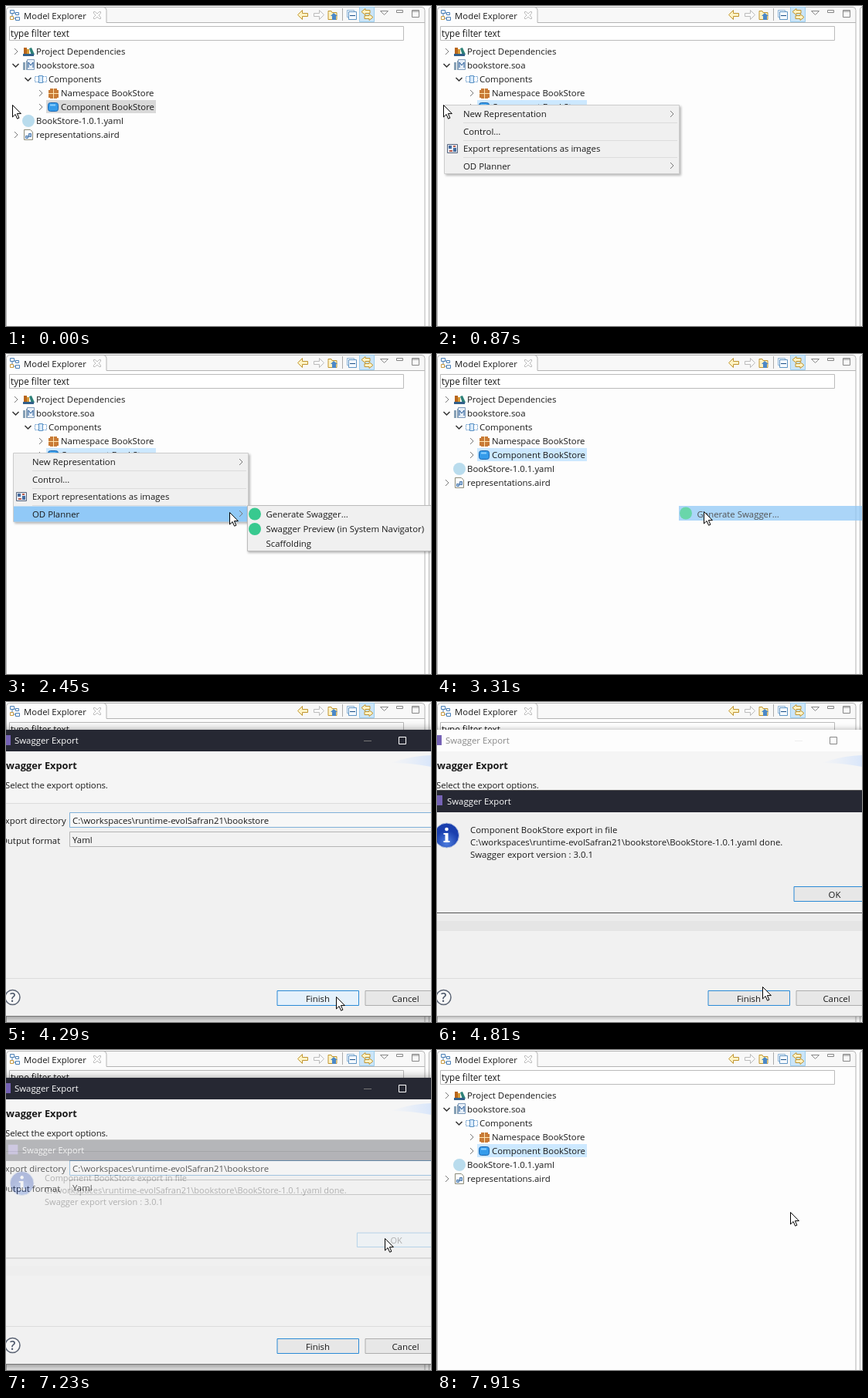
Recreate the animation shown at these times as an HTML page. Size 550x415 px, loop 8000 ms.

```html
<!DOCTYPE html>
<html lang="en">
<head>
<meta charset="utf-8">
<title>Model Explorer</title>
<style>
  html, body { margin: 0; width: 550px; height: 415px; overflow: hidden; background: #fdfdfd; }
  svg { display: block; }
  text { font: 11.4px "Open Sans", "Noto Sans", sans-serif; fill: #1a1a1a; white-space: pre; }
  .line { fill: none; stroke: #777; }
  .pale { fill: none; stroke: #dcdcdc; }
  .gold { fill: #fff3c4; stroke: #c09530; }
  .button { fill: #e7e7e7; stroke: #adadad; }
  .default { stroke: #2a8ad6; }
  .hover { fill: #e5f1fb; }
  .pressed { fill: #cce4f7; }
  .bar { fill: #262833; }
  .caption { fill: #fff; }
  .control { stroke: #fff; }
  .minimize { stroke: #777; }
  .frame { fill: #f1f1f1; stroke: #777; filter: drop-shadow(0 2px 7px #0008); }
  .inactive .frame { stroke: #aaa; filter: drop-shadow(0 1px 4px #0006); }
  .inactive .bar { fill: #fdfdfd; }
  .inactive .caption { fill: #888; }
  .inactive .control { stroke: #888; }
  .inactive .minimize { stroke: #eee; }
</style>
</head>
<body>
<svg width="550" height="415" viewBox="0 0 550 415">
  <defs>
    <path id="closed" class="line" d="M-2-4 2 0-2 4"/>
    <path id="open" class="line" style="stroke:#333;stroke-width:1.5" d="M-4-2 0 2 4-2"/>
    <linearGradient id="wave"><stop stop-color="#dce8fb" stop-opacity="0"/><stop offset="1" stop-color="#d9e6fa"/></linearGradient>
    <radialGradient id="info" cy=".8"><stop stop-color="#4f7fe0"/><stop offset="1" stop-color="#1a3fae"/></radialGradient>
  </defs>

  <!-- explorer view -->
  <path fill="#f8f8f8" d="M130 2h412v19H130z"/>
  <path class="line" style="stroke:#b4b4b4" d="M.5 415V5.5q0-4 4-4H538q4 0 4 4V415M126 1.5q4 0 4 4v16H542M547.5 415V4q0-2.500 3-2.500"/>
  <g fill="#fff" stroke="#4a7fb5"><path d="M8 8v8h4M9 9h4" fill="none"/><path d="M5.500 5.500h5v4h-5zM12.500 8.500h4v3h-4zM12.500 14.500h5v4h-5z"/><path d="M5.500 13.500h4v4h-4z" stroke="#c79a43"/></g>
  <text x="23" y="17">Model Explorer</text>
  <path class="line" style="stroke:#bbb" d="M113.500 7.500h2l2.500 2.500 2.500-2.500h2v2l-2.500 2.500 2.500 2.500v2h-2L118 14l-2.500 2.500h-2v-2L116 12l-2.500-2.500z"/>
  <path class="gold" d="M377.500 11.500l6-6v4h7v4h-7v4z"/>
  <path fill="#fafafa" stroke="#bbb" d="M411.500 11.500l-6-6v4h-7v4h7v4z"/>
  <path class="gold" d="M417 8.500V6.500h4l1 2h6v9h-11z"/><path fill="#4b88c7" d="M420 13l4-4 5 4h-2v5h-5v-5z"/>
  <path class="pale" style="stroke:#aaa" d="M435.500 3v16"/>
  <path fill="#f4f9ff" stroke="#8db4d6" d="M441.500 5.500h9v9h-9z"/><path fill="#f4f9ff" stroke="#5f94c2" d="M443.500 7.500h10v10h-10z"/><path stroke="#194f87" d="M445 12.500h7"/>
  <path fill="#cbe5f8" stroke="#9ccdec" d="M457.500 1.500h19v19h-19z"/>
  <path class="gold" d="M460 7.500l5-4v2h6v4h-6v2zM475 14.500l-5-4v2h-6v4h6v2z"/>
  <path class="line" style="stroke:#888" d="M484.500 6.500h10l-5 5zM505.500 5.500h8v3h-8zM525.500 5.500h9v9h-9zM525 7h10"/>
  <path fill="#fff" stroke="#bbb" d="M4.500 26.500h510v18H4.500z"/>
  <text x="6" y="40" style="font-size:11.7px">type filter text</text>

  <rect id="selection" x="52" y="122" width="142" height="17"/>
  <use href="#closed" x="13" y="59"/><use href="#open" x="12.500" y="77"/><use href="#open" x="28.500" y="95"/>
  <use href="#closed" x="45" y="113"/><use href="#closed" x="45" y="131"/><use href="#closed" x="13" y="167"/>
  <path fill="#b8651b" d="M23 54h4v9h-4z"/><path fill="#d79b36" d="M27 56h3v7h-3z"/><path fill="#2d8177" d="M30 55l3-1 4 9-4 1z"/><path fill="#315f8a" d="M22 62h14v3H22z"/>
  <path fill="#87a1b5" d="M22 73h3v10h-3zM26 71h3v12h-3z"/><path fill="#e6eef7" stroke="#7f9bba" d="M27.500 69.500h9v13h-9z"/><path class="line" style="stroke:#245a97" d="M29 80v-7l3 4 3-4v7"/>
  <path fill="none" stroke="#6f9fce" stroke-dasharray="2 1" d="M37.500 91.500h5v7h-5zM47.500 91.500h5v7h-5z"/><path fill="#d8eafd" stroke="#5b92c4" d="M42.500 90.500h5v9h-5z"/>
  <path fill="#c87a35" d="M55 109h13v10H55zM57 107h9v13h-9z"/><path stroke="#ffe6b3" d="M61.500 107v13M55 113.500h13"/>
  <rect x="54.500" y="125.500" width="13" height="11" rx="3" fill="#359bea" stroke="#1c65ae"/><path stroke="#8bd0ff" stroke-width="2" d="M57 128.500h7"/>
  <circle cx="29" cy="149" r="8" fill="#b9dced"/>
  <path fill="#fff" stroke="#8b8b79" d="M23.500 160.500h8l3 3v10h-11z"/><path fill="#a8c6e5" stroke="#4d79aa" d="M25.500 168.500h3v3h-3zM29.500 165.500h3v4h-3z"/>
  <text x="39" y="63">Project Dependencies</text>
  <text x="39" y="81">bookstore.soa</text>
  <text x="55" y="99">Components</text>
  <text x="71" y="117">Namespace BookStore</text>
  <text x="71" y="135">Component BookStore</text>
  <text x="39" y="153">BookStore-1.0.1.yaml</text>
  <text x="39" y="171">representations.aird</text>

  <!-- context menus -->
  <g id="menu">
    <path fill="#f0f0f0" stroke="#ccc" style="filter:drop-shadow(2px 2px 1.5px #0004)" d="M9.500 128.500h304v89H9.500z"/>
    <path class="pale" d="M34 151.500h277M34 174.500h277M34 196.500h277"/>
    <rect id="row" x="10" width="303" height="20" fill="#91c9f7"/>
    <use href="#closed" x="304" y="140"/><use href="#closed" x="304" y="207"/>
    <path fill="#e6e9f0" stroke="#56657e" d="M13.500 179.500h13v11h-13z"/><path fill="#466da0" d="M15 181h4v4h-4zM21 184h4v5h-4z"/><path fill="#b95d4c" d="M16 187h4v2h-4zM21 181h3v2h-3z"/>
    <text x="34" y="144">New Representation</text>
    <text x="34" y="167">Control...</text>
    <text x="34" y="189">Export representations as images</text>
    <text x="34" y="212">OD Planner</text>
  </g>
  <g id="submenu">
    <path fill="#f0f0f0" stroke="#bbb" style="filter:drop-shadow(1px 2px 1.5px #0004)" d="M312.500 196.500h250v59h-250z"/>
    <circle cx="322" cy="207.500" r="8" fill="#38c98f"/><circle cx="322" cy="227" r="8" fill="#38c98f"/>
    <text x="336.500" y="212">Generate Swagger...</text>
    <text x="336.500" y="231">Swagger Preview (in System Navigator)</text>
    <text x="336.500" y="250">Scaffolding</text>
  </g>
  <g id="pick">
    <path fill="#91c9f7" d="M313 197h240v19H313z"/>
    <circle cx="322" cy="206.500" r="8" fill="#38c98f"/>
    <text x="336.500" y="212">Generate Swagger...</text>
  </g>

  <!-- export dialog -->
  <g id="dialog">
    <path class="frame" d="M-20 36.500h600v371H-20z"/>
    <path class="bar" d="M-20 36h600v28H-20z"/>
    <path fill="#7562b5" d="M-7 43H6v13H-7z"/>
    <text class="caption" x="11" y="54">Swagger Export</text>
    <path class="minimize" d="M463 50.500h10"/><path class="line control" d="M508.500 45.500h9v9h-9z"/>
    <path fill="#f5f5f5" d="M-20 64h600v67H-20z"/>
    <path fill="url(#wave)" d="M498 79q25-9 52-10v15q-25-5-52-5z"/>
    <text x="-7" y="87" style="font-size:12.800px;font-weight:700">Swagger Export</text>
    <text x="-1" y="112" style="letter-spacing:-.1px">Select the export options.</text>
    <path class="pale" d="M0 131.500h550M0 358.500h550"/>
    <text x="-7.500" y="158">Export directory</text>
    <text x="-7" y="184">Output format</text>
    <path fill="#f7f7f7" stroke="#7fb0d8" d="M82.500 143.500h480v19h-480z"/>
    <path fill="#f2f2f2" stroke="#b5b5b5" d="M82.500 168.500h480v19h-480z"/>
    <text x="86" y="158">C:\workspaces\runtime-evolSafran21\bookstore</text>
    <text x="86" y="183">Yaml</text>
    <circle cx="8.500" cy="383" r="9.500" fill="#f8f8f8" stroke="#5c6575" stroke-width="1.500"/>
    <text x="8.500" y="389" text-anchor="middle" style="font-size:16px;font-weight:600;fill:#4d586b">?</text>
    <path id="finish" class="button default" d="M351 374.500h105.500v19H351z"/><path class="button" d="M465 374.500h106v19H465z"/>
    <text x="403.500" y="389" text-anchor="middle">Finish</text>
    <text x="517" y="389" text-anchor="middle">Cancel</text>
  </g>

  <!-- result message -->
  <g id="message">
    <path opacity=".05" d="M-20 284h620v13H-20z"/><path opacity=".02" d="M-20 274h620v10H-20z"/>
    <path fill="#f0f0f0" stroke="#555" d="M-20 114.500h620v159H-20z"/>
    <path class="bar" d="M-20 115h620v28H-20z"/>
    <path fill="#7562b5" d="M-6 121H7v13H-6z"/>
    <text class="caption" x="13" y="133">Swagger Export</text>
    <circle cx="12.500" cy="173" r="16" fill="url(#info)" stroke="#b8c5df"/>
    <path fill="#fff" d="M8.500 170h6v10h2v2h-8v-2h2v-8h-2z"/><circle cx="12.500" cy="165" r="2.300" fill="#fff"/>
    <text x="43" y="170">Component BookStore export in file</text>
    <text x="43" y="186">C:\workspaces\runtime-evolSafran21\bookstore\BookStore-1.0.1.yaml done.</text>
    <text x="43" y="202">Swagger export version : 3.0.1</text>
    <path id="ok" class="button default" d="M462 239.500h106v19H462z"/>
    <text x="514.500" y="254" text-anchor="middle">OK</text>
  </g>

  <path id="cursor" fill="#fff" stroke="#000" d="M.5.5v15.500l3.600-3.500 2.500 5.700 2.300-1-2.500-5.600h5z"/>
</svg>
<script>
const LOOP = 8000, STEP = 120;
const el = Object.fromEntries([...document.querySelectorAll('g[id], rect[id], path[id]')].map(e => [e.id, e]));

// Pointer moves: start, number of steps, end x, end y
const moves = [
  [1120, 4, 64, 208], [1970, 7, 345, 204], [3430, 5, 427, 382], [4690, 7, 397, 316],
  [5530, 2, 397, 298], [5770, 5, 484, 252], [6370, 1, 490, 244], [7760, 1, 488, 244], [7910, 1, 457, 210]
];
// Opacity held from each time on
const fades = {
  menu: [[750, .5], [870, 1], [3190, 0]],
  submenu: [[1600, .6], [1720, 1], [3190, 0]],
  dialog: [[3430, .5], [3550, 1], [7380, 0]],
  message: [[4540, .5], [4690, 1], [7230, .3], [7380, 0]]
};
const pickFade = [[0, 1], [3310, .75], [3430, .35], [3550, 0]];

const held = (keys, t) => keys.reduce((v, [at, next]) => t >= at ? next : v, 0);

function pointer(t) {
  let x = 8, y = 128;
  for (const [start, steps, toX, toY] of moves) {
    if (t < start) break;
    const p = Math.min(Math.floor((t - start) / STEP) + 1, steps) / steps;
    const e = p * p * (3 - 2 * p);
    x += (toX - x) * e;
    y += (toY - y) * e;
  }
  return [Math.round(x), Math.round(y)];
}

function show(e, opacity) {
  e.style.display = opacity ? '' : 'none';
  e.style.opacity = opacity;
}

function scaleAbout(e, x, y, s) {
  e.setAttribute('transform', `translate(${x} ${y}) scale(${s}) translate(${-x} ${-y})`);
}

function draw(t) {
  const [x, y] = pointer(t);
  el.cursor.setAttribute('transform', `translate(${x} ${y})`);
  for (const id in fades) show(el[id], held(fades[id], t));
  el.selection.setAttribute('fill', t < 500 ? '#d9d9d9' : '#cce8ff');

  show(el.row, t >= 1120 ? 1 : 0);
  el.row.setAttribute('y', 130 + Math.floor(Math.max(0, y - 130) / 22.3) * 22.5);
  show(el.pick, t >= 1970 && x >= 313 ? held(pickFade, t) : 0);

  scaleAbout(el.dialog, 245, 222, t < 3550 ? .965 : 1);
  scaleAbout(el.message, 245, 172, t < 4690 || t >= 7230 ? .965 : 1);
  el.dialog.classList.toggle('inactive', t >= 4410 && t < 7230);
  el.finish.classList.toggle('hover', t >= 3910 && t < 4690);
  el.ok.classList.toggle('hover', x >= 461 && y < 259);
  el.ok.classList.toggle('pressed', t >= 6370 && t < 6490);
}

function tick() {
  draw(performance.now() % LOOP);
  requestAnimationFrame(tick);
}
tick();
</script>
</body>
</html>
```
